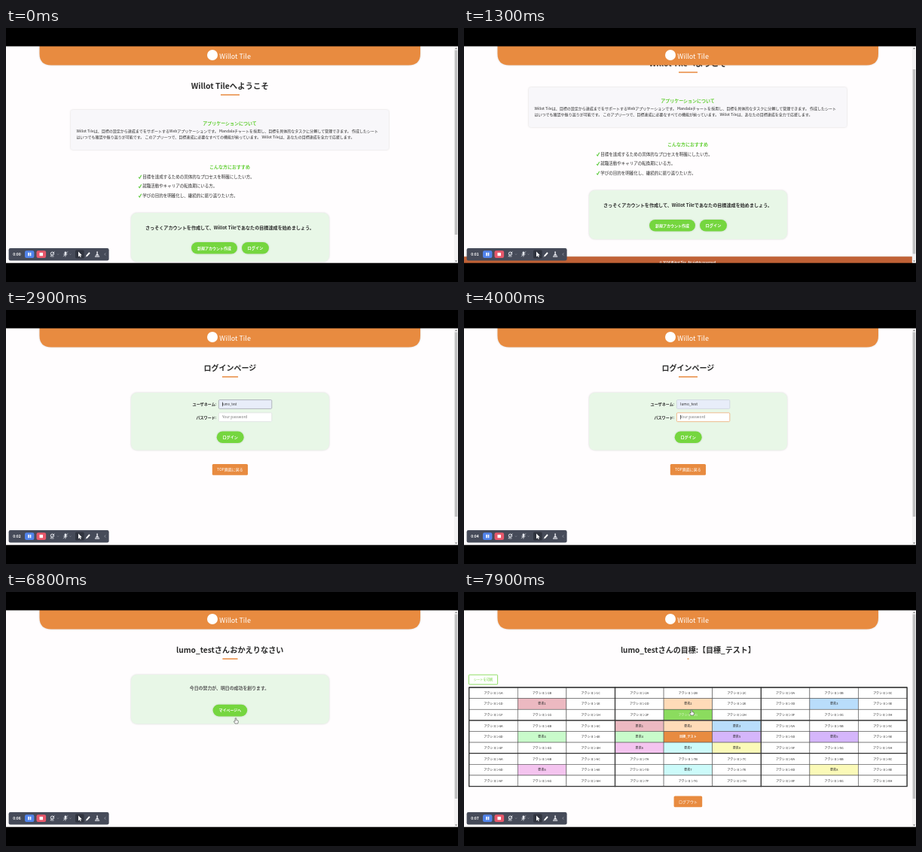
Write an HTML page that moves like this. It is 600 px wide and 338 px high and loops after 8000 ms.

```html
<!DOCTYPE html>
<html lang="ja">
<head>
<meta charset="utf-8">
<style>
html, body { margin: 0; width: 100%; height: 100%; overflow: hidden; background: #000; }
svg { display: block; width: 100vw; height: 100vh; }
text { font-family: "Noto Sans CJK JP", "Noto Sans CJK", "Noto Sans", sans-serif; }
.card, .pill { filter: drop-shadow(0 .8px 1.2px rgba(0, 0, 0, .16)); }
.hover .pill { fill: #6bd36a; filter: drop-shadow(0 1px 1.5px rgba(60, 130, 200, .45)); }
.hover { transform: translateY(-.7px); }
</style>
</head>
<body>
<svg id="stage" viewBox="0 0 600 338" preserveAspectRatio="none"></svg>
<script>
const LOOP = 8000;
const BRAND = 'Willot Tile', USER = 'lumo_test';
const ORANGE = '#e88b40', GREEN = '#75d63f', INK = '#2b2b2b';
const LOGIN_AT = 2000, WELCOME_AT = 5940, SHEET_AT = 7700;

const rect = (x, y, w, h, fill, extra = '') =>
  `<rect x="${x}" y="${y}" width="${w}" height="${h}" fill="${fill}" ${extra}/>`;
const line = (d, stroke, width, extra = '') =>
  `<path d="${d}" fill="none" stroke="${stroke}" stroke-width="${width}" ${extra}/>`;

// y is the vertical middle of the glyphs
const text = (x, y, size, str, { fill = INK, weight = 400, anchor = 'start', id = '' } = {}) =>
  `<text ${id && `id="${id}"`} x="${x}" y="${y + size * .37}" font-size="${size}" fill="${fill}"
    font-weight="${weight}" text-anchor="${anchor}">${str}</text>`;
const mid = (x, y, size, str, fill = INK, weight = 700) =>
  text(x, y, size, str, { fill, weight, anchor: 'middle' });

const greenCard = (y, h) => rect(166, y, 263, h, '#e8f7e7', 'rx="8" class="card"');
const pill = (id, x, y, w, label, size) =>
  `<g id="${id}">${rect(x, y, w, 15.6, GREEN, 'rx="7.8" class="pill"')}
   ${mid(x + w / 2, y + 7.7, size, label, '#fff')}</g>`;
const heading = (str, size, id) =>
  mid(297.3, 77, size, str) + rect(285, 88.2, 25, 1.5, ORANGE, `id="${id}"`);
const orangeButton = (x, y, w, label) =>
  rect(x, y, w, 14.8, ORANGE, 'rx="1.6"') + mid(x + w / 2, y + 7.4, 5, label, '#fff', 500);

function homePage() {
  const points = [
    '目標を達成するための具体的なプロセスを明確にしたい方。',
    '就職活動やキャリアの転換期にいる方。',
    '学びの目的を明確化し、継続的に振り返りたい方。'
  ];
  const list = points.map((p, i) => {
    const y = 197.7 + i * 12.5;
    return line(`M176 ${y + .8}l1.3 1.6l2.4-4.4`, '#5ccb3c', 1.1) + text(181.3, y, 5.5, p);
  }).join('');
  return heading(BRAND + 'へようこそ', 10.4, 'lineHome')
    + rect(86, 109, 422, 53, '#f8f7fa', 'rx="3" class="card"')
    + mid(297, 127.2, 6, 'アプリケーションについて', '#63cf35')
    + text(93.5, 136.7, 5.02, BRAND + 'は、目標の設定から達成までをサポートするWebアプリケーションです。 Mandalaチャートを採用し、目標を具体的なタスクに分解して管理できます。 作成したシート', { weight: 500 })
    + text(93.5, 145.6, 5.02, 'はいつでも確認や振り返りが可能です。 このアプリ一つで、目標達成に必要なすべての機能が揃っています。 ' + BRAND + 'は、あなたの目標達成を全力で応援します。', { weight: 500 })
    + mid(297, 184.7, 6, 'こんな方におすすめ', '#63cf35') + list
    + greenCard(246, 65)
    + mid(297, 266.2, 6.1, `さっそくアカウントを作成して、${BRAND}であなたの目標達成を始めましょう。`)
    + pill('signUp', 246, 285, 61, '新規アカウント作成', 5)
    + pill('toLogin', 313, 285, 36, 'ログイン', 5.2)
    + rect(0, 334.2, 595, 17, '#c06236', 'class="card"')
    + mid(297.5, 342.8, 4.15, `© 2024 ${BRAND}. All rights reserved.`, '#fff');
}

function loginPage() {
  const label = (y, s) => text(279.5, y, 5.1, s, { weight: 700, anchor: 'end' });
  const field = (id, y, fill) =>
    rect(282.4, y, 70.4, 11.8, fill, `id="${id}" rx="1.2" stroke-width=".7"`);
  const dots = [0, 1, 2, 3].map(i =>
    `<circle class="dot" cx="${288 + i * 1.85}" cy="142.7" r=".7" fill="${INK}"/>`).join('');
  return heading('ログインページ', 10, 'lineLogin') + greenCard(110, 76.5)
    + label(125.6, 'ユーザネーム:') + label(142.8, 'パスワード:')
    + field('userBox', 119.6, '#e8edf9') + field('passBox', 136.8, '#fff')
    + text(287, 125.3, 4.9, USER, { id: 'userText' })
    + text(287, 142.6, 4.9, 'Your password', { id: 'hint', fill: '#777' })
    + dots + rect(287, 0, .6, 5.6, '#111', 'id="caret"')
    + pill('submit', 279.7, 161.4, 36, 'ログイン', 5.1)
    + orangeButton(273.8, 205, 47.2, 'TOP画面に戻る');
}

function welcomePage() {
  return heading(USER + 'さんおかえりなさい', 10.2, 'lineWelcome') + greenCard(110, 65.5)
    + mid(296.5, 128.3, 5.9, '今日の努力が、明日の成功を創ります。', '#555')
    + pill('myPage', 274.6, 149.8, 45.6, 'マイページへ', 5);
}

function sheetPage() {
  const colors = ['#ecb9c1', '#ffdbb8', '#b9ddfb', '#c9fbcb', '#d5b6fb', '#f4c4ef', '#ccfbfa', '#fbfab8'];
  const X = 6.7, Y = 127, W = 64.6, H = 14.62;
  let out = '';
  for (let r = 0; r < 9; r++) for (let c = 0; c < 9; c++) {
    const block = (r / 3 | 0) * 3 + (c / 3 | 0), cell = (r % 3) * 3 + c % 3;
    const skip = n => n > 4 ? n - 1 : n;
    let fill = '#fff', ink = INK, weight = 400, label;
    if (block === 4 && cell === 4) {
      [fill, ink, weight, label] = [ORANGE, '#fff', 700, '目標_テスト'];
    } else if (block === 4 || cell === 4) {
      const n = skip(block === 4 ? cell : block);
      [fill, weight, label] = [colors[n], 500, '要素' + (n + 1)];
    } else {
      label = `アクション${skip(block) + 1}${'ABCDEFGH'[skip(cell)]}`;
      if (r === 2 && c === 4) [fill, ink] = ['#8bdc5e', '#e4f8d8'];
    }
    const x = X + c * W, y = Y + r * H;
    out += rect(x, y, W, H, fill, 'stroke="#555" stroke-width=".6"')
      + mid(x + W / 2, y + H / 2, 4.1, label, ink, weight);
  }
  for (let i = 0; i < 4; i++) {
    out += line(`M${X + i * 3 * W} ${Y - .6}v${9 * H + 1.2}M${X} ${Y + i * 3 * H}h${9 * W}`, '#333', 1.3);
  }
  return heading(`${USER}さんの目標:【目標_テスト】`, 10, 'lineSheet')
    + rect(6.4, 110.2, 38.2, 12.8, '#fff', `rx="1" stroke="${GREEN}" stroke-width=".8"`)
    + mid(25.5, 116.6, 4.25, 'シートを印刷', GREEN, 500) + out
    + orangeButton(278.6, 271.5, 37.6, 'ログアウト');
}

function toolbar() {
  const pale = '#e6e8ee';
  const chevron = x => line(`M${x - 1} 300.6l1 1l1-1`, '#9a9eab', .6);
  return rect(3.6, 293, 133, 16.4, '#464b59', 'rx="2.2"')
    + text(9.3, 301, 5, '0:00', { id: 'clock', fill: '#fff', weight: 700 })
    + rect(25, 296.2, 12.4, 9.8, '#5183ea', 'rx="2.2"')
    + rect(29.2, 298.9, 1.6, 4.4, '#fff') + rect(31.7, 298.9, 1.6, 4.4, '#fff')
    + rect(40.5, 296.2, 12.6, 9.8, '#e7586b', 'rx="2.2"')
    + rect(44.5, 298.9, 4.5, 4.4, '#fff', 'rx=".6"')
    + `<circle cx="61.5" cy="300.3" r="2.2" fill="none" stroke="${pale}" stroke-width="1"/>`
    + line('M59.5 304h4M58.8 304.2l5.6-6.6', pale, .8) + chevron(69)
    + rect(77.6, 297.4, 2.6, 4.6, pale, 'rx="1.3"')
    + line('M76.4 300.6q2.5 4.4 5 0M78.9 302.8v1.8M76 304.2l6-6.8', pale, .7) + chevron(85.5)
    + rect(92, 295.6, 11.6, 11, '#30343f', 'rx="1.5"')
    + `<path d="M96 297.4v7l1.7-1.5l1.1 2.3l1-.5l-1.1-2.2h2.2z" fill="#fff"/>`
    + line('M106.8 303.6l4.2-4.6', '#fff', 1.9) + line('M106 304.6l1-1.3', '#fff', .8)
    + `<path d="M120.2 297.6h1.8l-.3 2.8l2 2.4h-5.2l2-2.4zM118 303.5h6.2v1.2h-6.2z" fill="${pale}"/>`
    + line('M132.2 299.5l-1.4 1.6l1.4 1.6', '#b9bcc6', .6);
}

document.getElementById('stage').innerHTML =
  rect(0, 24, 600, 290, '#fffdfe')
  + `<g id="home">${homePage()}</g><g id="login">${loginPage()}</g>
     <g id="welcome">${welcomePage()}</g><g id="sheet">${sheetPage()}</g>`
  + `<path d="M44.5 24H550V34Q550 49.5 534.500 49.500H60Q44.5 49.5 44.500 34Z" fill="${ORANGE}" class="card"/>`
  + '<circle cx="274" cy="36" r="7" fill="#fff"/>'
  + text(283.3, 38, 9, BRAND, { fill: '#fff' })
  + rect(594.8, 24, 5.2, 290, '#f3f2f3') + rect(595.7, 29.5, 3.6, 245.500, '#c0c0c1', 'id="thumb"')
  + '<path d="M596 28l1.500-1.800l1.500 1.800zM596 309.500l1.500 1.800l1.500-1.800z" fill="#777"/>'
  + rect(0, 0, 600, 24.4, '#000') + rect(0, 312.7, 600, 26, '#000')
  + toolbar()
  + `<path id="hand" d="M-.8 0Q0-1 .8 0V2.600L3 3.200Q3.600 3.500 3.400 4.600L2.800 7H-1L-2.600 4.200Q-2.500 3.200-.8 4.200Z"
      fill="#fff" stroke="#333" stroke-width=".55"/>`;

const el = id => document.getElementById(id);
const show = (node, on) => node.setAttribute('display', on ? 'inline' : 'none');
const clamp = v => Math.max(0, Math.min(1, v));
const ease = p => p * p * (3 - 2 * p);
const ramp = (t, from, to) => ease(clamp((t - from) / (to - from)));
const dots = [...document.querySelectorAll('.dot')];

function growLine(id, since) {
  const w = 25 * ease(clamp(since / 1200));
  el(id).setAttribute('x', 297.5 - w / 2);
  el(id).setAttribute('width', w);
}

function render(t) {
  const page = t < LOGIN_AT ? 'home' : t < WELCOME_AT ? 'login' : t < SHEET_AT ? 'welcome' : 'sheet';
  for (const id of ['home', 'login', 'welcome', 'sheet']) show(el(id), id === page);

  const scroll = page === 'home' ? 30 * ramp(t, 1130, 1300) + 8 * ramp(t, 1300, 1500) : 0;
  el('home').setAttribute('transform', `translate(0 ${-scroll})`);
  el('thumb').setAttribute('y', 29.5 + scroll * .85);
  growLine('lineLogin', t - LOGIN_AT);
  growLine('lineWelcome', t - WELCOME_AT);
  growLine('lineSheet', t - SHEET_AT);

  // login form
  const filled = t >= 3200, focused = t >= 3900;
  const typed = focused ? Math.max(0, Math.min(4, Math.floor((t - 3900) / 200))) : 0;
  el('userText').setAttribute('font-size', filled ? 4.9 : 4.1);
  el('userBox').setAttribute('stroke', focused ? '#c9cfdc' : '#9a9ca6');
  el('passBox').setAttribute('stroke', focused ? '#eda366' : '#dcdfe0');
  show(el('hint'), typed === 0);
  dots.forEach((d, i) => show(d, i < typed));
  el('caret').setAttribute('x', focused ? 287 + typed * 1.85 : filled ? 310 : 287);
  el('caret').setAttribute('y', focused ? 139.800 : 122.600);

  // pointer
  const up = ramp(t, 6850, 7200), down = ramp(t, 4750, 5000);
  const x = 310 - 5 * down - 3 * up, y = 150 + 18 * down - 11 * up;
  el('hand').setAttribute('transform', `translate(${x} ${y})`);
  show(el('hand'), t >= 4800);
  el('toLogin').classList.toggle('hover', t >= 1550);
  el('submit').classList.toggle('hover', t >= 4900);
  el('myPage').classList.toggle('hover', y < 165);

  el('clock').textContent = '0:0' + Math.floor(t / 1000);
}

const start = performance.now();
function frame() {
  render((performance.now() - start) % LOOP);
  requestAnimationFrame(frame);
}
frame();
</script>
</body>
</html>
```
